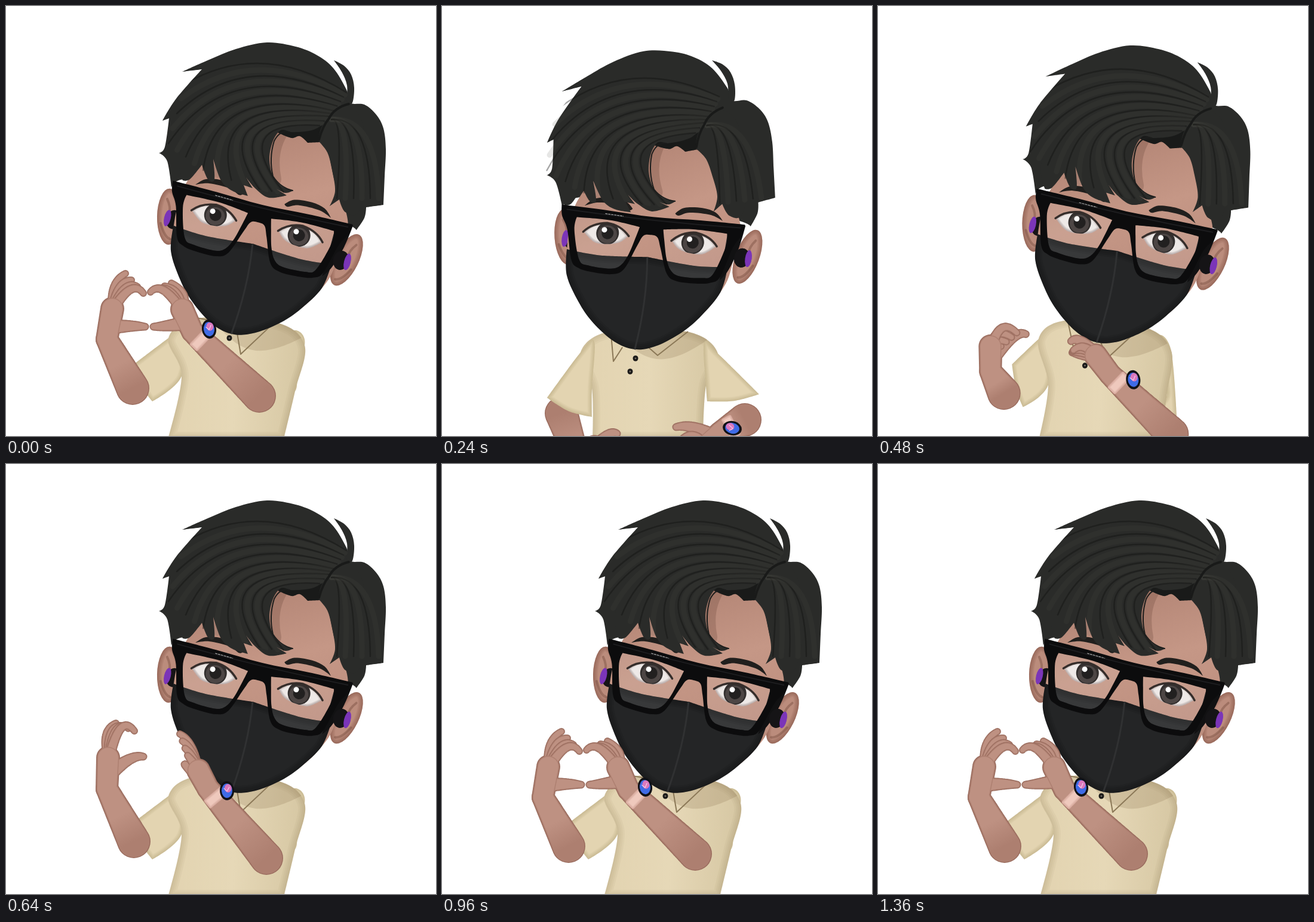
These frames come from a looping animation (720 px wide and 720 px high, 1440 ms). An HTML page with a canvas:

```html
<!DOCTYPE html>
<html lang="en">
<head>
<meta charset="utf-8">
<title>Heart hands</title>
<style>
html, body { margin: 0; width: 100%; height: 100%; overflow: hidden; background: #fff; }
canvas { display: block; width: 100vw; height: 100vh; }
</style>
</head>
<body>
<canvas id="stage" width="720" height="720"></canvas>
<script>
const ctx = document.getElementById('stage').getContext('2d');
const LOOP = 1440, STEP = 80;
// rest, low, half raised, open hands, heart
const KEY_TIMES = [80, 240, 400, 640, 880];
const ARMS_IN_FRONT = 320;

const HAIR = '#2a2b29', BLACK = '#0c0c0d', SHIRT = '#e3d4b1';
const SKIN_TONES = ['#9b6d5f', '#ae8071', '#be9182'];

// A trailing "!" marks a corner.
const points = text => text.split(/\s+/).map(word => {
  const [x, y] = word.split(',').map(parseFloat);
  return { x, y, hard: word.endsWith('!') };
});
const corner = p => ({ ...p, hard: true });
const at = (p, dx, dy) => ({ ...p, x: p.x + dx, y: p.y + dy });
const mix = (a, b, k) => ({ x: a.x + (b.x - a.x) * k, y: a.y + (b.y - a.y) * k });

// Smooth closed outline through the points.
function outline(list) {
  const path = new Path2D(), n = list.length;
  const tangent = i => {
    const p = list[i], a = list[(i + n - 1) % n], b = list[(i + 1) % n];
    return p.hard ? [0, 0] : [(b.x - a.x) / 6, (b.y - a.y) / 6];
  };
  path.moveTo(list[0].x, list[0].y);
  list.forEach((p, i) => {
    const j = (i + 1) % n, q = list[j], u = tangent(i), v = tangent(j);
    path.bezierCurveTo(p.x + u[0], p.y + u[1], q.x - v[0], q.y - v[1], q.x, q.y);
  });
  path.closePath();
  return path;
}
const shape = text => outline(points(text));
// Half an outline, from the axis x = 0 back to it, completed by its reflection.
function symmetric(text) {
  const half = points(text);
  return outline([...half, ...half.slice(1, -1).reverse().map(p => ({ ...p, x: -p.x }))]);
}

// Monotone cubic through the key poses.
function ease(values, t) {
  const T = KEY_TIMES, last = values.length - 1;
  if (t <= T[0]) return values[0];
  if (t >= T[last]) return values[last];
  const slope = i => (values[i + 1] - values[i]) / (T[i + 1] - T[i]);
  const tangent = i => {
    if (i === 0 || i === last) return 0;
    const a = slope(i - 1), b = slope(i);
    return a * b > 0 ? 2 * a * b / (a + b) : 0;
  };
  let i = 0;
  while (t > T[i + 1]) i++;
  const h = T[i + 1] - T[i], k = (t - T[i]) / h, k2 = k * k, k3 = k2 * k;
  return values[i] * (2 * k3 - 3 * k2 + 1) + values[i + 1] * (3 * k2 - 2 * k3)
    + tangent(i) * h * (k3 - 2 * k2 + k) + tangent(i + 1) * h * (k3 - k2);
}
const pose = (keys, t) => keys[0].map((p, i) => ({
  x: ease(keys.map(k => k[i].x), t),
  y: ease(keys.map(k => k[i].y), t)
}));

// Forelock tip, right hair corner, chin, then how far near parts slide over far ones.
const headKeys = [
  '167,151 530,296 323,551 -14,4',
  '201,143 558,321 325,569 -15,8',
  '266,125 609,339 357,566 -6,6',
  '295,110 632,333 377,549 0,0'
].map(points);

// For each side: shoulder, outer cuff, inner cuff, armpit, hip. Then top button and collar tip.
const shirtKeys = [
  '222,568 186,682 246,699 245,632 245,725  462,568 509,655 448,686 427,632 435,725  326,575 366,568',
  '232,580 176,656 251,688 251,640 252,725  462,582 531,650 444,662 442,636 437,725  324,590 361,585',
  '265,560 228,600 242,678 277,640 268,725  483,580 522,703 475,690 484,650 475,725  343,589 377,592',
  '272,556 214,600 245,662 294,620 271,725  500,568 453,684 408,614 484,645 465,725  374,556 393,583'
].map(points);

// Elbow, wrist, knuckles, then bend and tip of index, little finger and thumb.
const leftRaised = [
  '208,660 203,664 202,628  222,607 246,617  200,647 222,657  238,605 261,597',
  '214,632 169,544 171,492  194,441 215,447  169,452 184,434  204,496 230,490',
  '212,640 169,558 178,507  210,474 230,481  183,467 200,448  208,536 233,537'
].map(points);
// The right arm ends with the watch dial.
const rightRaised = [
  '510,735 418,662 390,636  362,620 341,635  370,660 348,660  367,607 338,606  455,668',
  '436,660 338,543 322,513  311,497 304,488  308,470 291,452  309,511 299,503  370,547',
  '424,653 312,545 295,508  262,475 242,479  296,482 277,464  272,535 247,537  340,541'
].map(points);

// Before they rise the hands are the half-raised ones, lowered.
function lowered(hand, dx, dy, elbow) {
  const [, ...rest] = hand.map(p => at(p, dx, dy));
  return [{ x: elbow[0], y: elbow[1] }, ...rest];
}
const armLeft = [lowered(leftRaised[0], 32, 170, [216, 700]), lowered(leftRaised[0], 32, 119, [200, 682]), ...leftRaised];
const armRight = [lowered(rightRaised[0], 45, 160, [478, 700]), lowered(rightRaised[0], 54, 99, [507, 693]), ...rightRaised];
Object.assign(armRight[1][1], { x: 466, y: 714 });
Object.assign(armRight[1][9], { x: 486, y: 707 });

const hair = {
  back: shape('295,110! 340,90 385,72 437,61 485,68 520,82 548,104 570,140 576,162 600,165 620,182 632,205 636,240 634,285 632,333! 603,337! 600,355 586,376! 560,360 400,300 300,290 277,304! 270,260 256,246! 266,236 273,188! 262,192! 285,155 328,106!'),
  tuft: shape('549,91! 566,100 578,115 583,137 580,162 571,162 571,133 562,110'),
  part: shape('455,212! 470,190 500,185 535,200 526,228! 505,229! 492,218 478,221'),
  fringe: shape('475,211! 460,208 447,226 441,255 447,285 462,302 481,309! 468,313 452,306! 470,317! 440,321 418,306 402,287! 413,305! 398,300! 405,318! 378,309 360,292 347,256! 349,291 338,290 328,266! 308,290 296,292! 290,250 320,180 400,120 500,130 560,165 520,205'),
  side: shape('523,226! 538,245 546,275 551,310 542,335! 558,324! 568,345 590,345 605,280 595,190 560,165 530,200')
};
const skin = shape('300,300 326,266! 360,250 420,235 445,195! 500,195 530,215 541,250 552,300 568,340 572,375 556,420 535,465 480,515 390,540 320,500 284,410 282,360');

// Face parts lie in a tilted frame with the nose bridge at the origin.
const FACE = { x: 420.5, y: 368, tilt: .239 };
const mask = symmetric('0,31! 80,37 136,33! 130,76 104,118 78,147 46,171 20,183 0,186');
const lens = shape('20,-17! 70,-23 127,-22! 128,0 113,48 95,56 58,57 42,49 32,30 24,0');
const rim = symmetric('0,-36 80,-39 155,-40! 152,-22 140,0 126,50 112,62 90,66 55,66 36,55 20,15 12,-3 0,-6');
const eye = shape('37,0! 55,-15 75,-18 98,-12 112,1! 92,16 70,17 50,12');
const brow = shape('36,-46! 50,-57 80,-60 103,-55 117,-42! 95,-50 60,-50 42,-43');
const temple = shape('128,-25! 156,-39! 150,0 138,38 126,56!');

// Start, pull and end of the main locks; finer strands are blended between them.
const locks = [
  '570,145 430,55 300,130', '560,160 370,85 272,230', '548,175 350,130 330,275',
  '540,185 330,170 425,308', '525,200 370,190 465,312'
].map(points);

function stroke(path, color, width) {
  ctx.strokeStyle = color;
  ctx.lineWidth = width;
  ctx.stroke(typeof path === 'string' ? new Path2D(path) : path);
}
function fill(path, color, rule = 'nonzero') {
  ctx.fillStyle = color;
  ctx.fill(path, rule);
}
function within(path, draw) {
  ctx.save();
  ctx.clip(path);
  draw();
  ctx.restore();
}
// Flat colour that darkens softly towards the edge.
function solid(path, color, edge, width) {
  fill(path, color);
  within(path, () => {
    for (let i = 1; i <= 4; i++) stroke(path, edge, width * i / 4);
  });
}
function oval(x, y, rx, ry, angle = 0) {
  const path = new Path2D();
  path.ellipse(x, y, rx, ry, angle, 0, 7);
  return path;
}
function gradient(a, b, ...colors) {
  const g = ctx.createLinearGradient(a.x, a.y, b.x, b.y);
  colors.forEach((c, i) => g.addColorStop(i / (colors.length - 1), c));
  return g;
}
const quad = (a, b, c) => `M${a.x} ${a.y}Q${b.x} ${b.y} ${c.x} ${c.y}`;

function moved(draw, dx, dy) {
  ctx.save();
  ctx.translate(dx, dy);
  draw();
  ctx.restore();
}
function inHead(matrix, draw) {
  ctx.save();
  ctx.transform(matrix.a, matrix.b, matrix.c, matrix.d, matrix.e, matrix.f);
  draw();
  ctx.restore();
}
function inFace(draw) {
  ctx.save();
  ctx.translate(FACE.x, FACE.y);
  ctx.rotate(FACE.tilt);
  draw();
  ctx.restore();
}
function bothSides(draw) {
  for (const side of [1, -1]) {
    ctx.save();
    ctx.scale(side, 1);
    draw(side);
    ctx.restore();
  }
}

function headMatrix(corners) {
  const basis = ([a, b, c]) => new DOMMatrix([b.x - a.x, b.y - a.y, c.x - a.x, c.y - a.y, a.x, a.y]);
  return basis(corners).multiply(basis(headKeys[3]).inverse());
}

function drawTorso(joints, matrix) {
  const [shoulderL, , , pitL, hipL, shoulderR, , , pitR, hipR, button, tip] = joints;
  const neckL = at(mix(shoulderL, shoulderR, .22), 0, -36);
  const neckR = at(mix(shoulderR, shoulderL, .22), 0, -36);
  const body = outline([neckL, shoulderL, pitL, corner(hipL), corner(hipR), pitR, shoulderR, neckR]);
  solid(body, gradient(shoulderL, shoulderR, '#e2d3b0', '#e6d8b7', '#d6c7a3'), 'rgba(120,98,62,.05)', 24);
  within(body, () => inHead(matrix, () => inFace(() =>
    moved(() => fill(mask, 'rgba(125,103,68,.2)'), 38, 18))));
  for (const [neck, end] of [[neckR, tip], [neckL, mix(tip, button, 2)]]) {
    stroke(`M${neck.x} ${neck.y}L${end.x} ${end.y}L${mix(end, button, .4).x} ${button.y - 18}`, '#8b7857', 2);
  }
  for (const p of [button, at(button, -9, 22)]) {
    fill(oval(p.x, p.y, 4.5, 4.8), '#1b1a19');
    fill(oval(p.x, p.y, 1.4, 1.2), '#77716a');
  }
}

function drawSleeves(joints) {
  const middle = mix(joints[0], joints[5], .5);
  for (const first of [0, 5]) {
    const [shoulder, outer, inner, pit] = joints.slice(first, first + 4);
    const cuff = mix(shoulder, mix(outer, inner, .5), 1.07);
    const top = at(mix(shoulder, middle, .2), 0, -18);
    solid(outline([top, shoulder, corner(outer), cuff, corner(inner), pit]), SHIRT, 'rgba(120,98,62,.06)', 14);
  }
}

// Row of discs along a bent line, each with its own radius.
function bone(a, bend, b, r0, r1, inset) {
  const path = new Path2D(), pull = mix(mix(a, b, .5), bend, 2), count = 40;
  for (let i = 0; i <= count; i++) {
    const k = i / count, p = mix(mix(a, pull, k), mix(pull, b, k), k);
    path.ellipse(p.x, p.y, r0 + (r1 - r0) * k - inset, r0 + (r1 - r0) * k - inset, 0, 0, 7);
    path.closePath();
  }
  return path;
}

function drawArm([elbow, wrist, knuckles, indexBend, indexTip, littleBend, littleTip, thumbBend, thumbTip]) {
  const tones = [...SKIN_TONES.slice(0, 2), gradient(wrist, elbow, SKIN_TONES[2], SKIN_TONES[2], '#ad7f70')];
  const arm = i => {
    const inset = i * 1.6;
    fill(bone(elbow, mix(elbow, wrist, .5), wrist, 28, 19, inset), tones[i]);
    fill(bone(wrist, mix(wrist, knuckles, .5), knuckles, 19, 20, inset), tones[i]);
  };
  const finger = (base, bend, tip, r0, r1) =>
    tones.forEach((tone, i) => fill(bone(base, bend, tip, r0, r1, i * 1.2), tone));

  arm(0);
  finger(mix(wrist, knuckles, .4), thumbBend, thumbTip, 13, 6.5);
  for (let i = 3; i >= 0; i--) {
    const bend = mix(indexBend, littleBend, i / 3);
    finger(mix(knuckles, bend, .2), bend, mix(indexTip, littleTip, i / 3), 9, 6);
  }
  arm(1);
  arm(2);
}

function drawWatch([elbow, wrist, , , , , , , , dial]) {
  const angle = Math.atan2(elbow.y - wrist.y, elbow.x - wrist.x);
  ctx.save();
  ctx.translate(wrist.x, wrist.y);
  ctx.rotate(angle);
  const strap = new Path2D();
  strap.roundRect(11, -19, 18, 38, 3);
  solid(strap, '#efc9bd', 'rgba(150,90,75,.08)', 8);
  ctx.restore();
  ctx.save();
  ctx.translate(dial.x, dial.y);
  ctx.rotate(angle - .9);
  fill(oval(0, 0, 12, 16), '#111116');
  fill(oval(0, 0, 9, 12), '#3f6be6');
  fill(oval(2, -4, 6, 7), '#dc78bd');
  stroke('M-5 -4L0 1L4 -6', '#f4dbf0', 1);
  ctx.restore();
}

function drawEars() {
  ctx.translate(6, 0);
  bothSides(() => {
    solid(oval(153, 20, 20, 47, .22), '#bb8c7c', 'rgba(95,55,42,.1)', 16);
    stroke('M163 -8Q153 4 154 16M164 34Q152 56 142 56', 'rgba(100,60,48,.35)', 4);
    drawBud();
  });
}
function drawBud() {
  fill(oval(144, 23, 13, 16), '#151416');
  fill(oval(155, 23, 5.5, 14), '#7b35b8');
}

function drawFace() {
  bothSides(side => {
    solid(eye, '#ece7e4', 'rgba(80,55,48,.1)', 8);
    within(eye, () => {
      fill(oval(72, -1, 19, 19), '#1f1a19');
      fill(oval(72, 1, 16, 15), '#3b3432');
      fill(oval(72, -1, 10, 10), '#0c0a0a');
      fill(oval(72 - 6 * side, -6, 4.5, 4.5), '#fff');
    });
    stroke('M36 0Q52 -17 75 -18Q100 -15 113 1', '#211815', 3.5);
    fill(brow, '#211f1d');
  });
  solid(mask, '#242526', 'rgba(0,0,0,.08)', 24);
  stroke('M0 33C8 90 6 140 1 185', '#303132', 3);
}

function drawGlasses() {
  fill(temple, '#111112');
  const frame = new Path2D(rim);
  bothSides(side => {
    fill(lens, 'rgba(255,255,255,.09)');
    frame.addPath(lens, new DOMMatrix([side, 0, 0, 1, 0, 0]));
  });
  fill(frame, BLACK, 'evenodd');
  stroke('M-145 -33Q0 -28 148 -34', '#1d1d1f', 2);
  ctx.setLineDash([3, 2]);
  stroke('M-80 -33L-50 -32', '#aaa', 1.2);
  ctx.setLineDash([]);
}

function drawStrands() {
  const fine = 4;
  const strand = (path, i) => i % 2
    ? stroke(path, 'rgba(80,82,76,.14)', 9)
    : stroke(path, 'rgba(12,13,12,.36)', 2.5);
  for (let i = 0; i <= (locks.length - 1) * fine; i++) {
    const row = Math.min(Math.floor(i / fine), locks.length - 2);
    strand(quad(...locks[row].map((p, j) => mix(p, locks[row + 1][j], i / fine - row))), i);
  }
  for (let i = 0; i < 6; i++) {
    strand(`M545 190Q${565 + 11 * i} 185 ${554 + 14 * i} 322`, i);
  }
}

function drawFrontHair() {
  fill(hair.part, '#191a19');
  fill(hair.fringe, HAIR);
  fill(hair.side, HAIR);
  within(hair.back, drawStrands);
  stroke('M475 211Q459 207 449 226Q440 255 447 285Q459 304 480 309', '#1c1d1c', 2);
  stroke('M574 164Q550 170 541 188Q530 201 524 224', '#191a19', 4);
}

function drawHead(slide) {
  const face = [slide.x * .2, slide.y * .7];
  const ears = [slide.x * -.4, 0];
  moved(() => inFace(drawEars), ...ears);
  fill(hair.back, HAIR);
  fill(hair.tuft, HAIR);
  moved(() => {
    fill(skin, gradient({ x: 440, y: 220 }, { x: 500, y: 430 }, '#b58777', '#c59786', '#bd8f7f'));
    inFace(drawFace);
  }, ...face);
  moved(() => {
    within(skin, () => stroke('M462 205Q437 240 447 290', 'rgba(95,60,48,.25)', 28));
    drawFrontHair();
  }, slide.x, slide.y);
  moved(() => inFace(drawGlasses), ...face);
  moved(() => inFace(() => {
    ctx.translate(6, 0);
    drawBud();
  }), ...ears);
}

function render(t) {
  const corners = pose(headKeys, t), matrix = headMatrix(corners);
  const shirt = pose(shirtKeys, t), left = pose(armLeft, t), right = pose(armRight, t);
  const drawArms = () => {
    drawArm(left);
    drawArm(right);
    drawWatch(right);
  };
  const raised = t >= ARMS_IN_FRONT;

  ctx.fillStyle = '#fff';
  ctx.fillRect(0, 0, 720, 720);
  if (raised) drawSleeves(shirt);
  drawTorso(shirt, matrix);
  if (!raised) {
    drawArms();
    drawSleeves(shirt);
  }
  inHead(matrix, () => drawHead(corners[3]));
  if (raised) drawArms();
}

ctx.lineCap = ctx.lineJoin = 'round';
const start = performance.now();
function tick() {
  const elapsed = Math.max(0, performance.now() - start) % LOOP;
  // The loop opens on the finished heart, then cuts to the resting pose.
  const t = Math.floor(elapsed / STEP) * STEP;
  render(t < STEP ? LOOP : t);
  requestAnimationFrame(tick);
}
tick();
</script>
</body>
</html>
```
